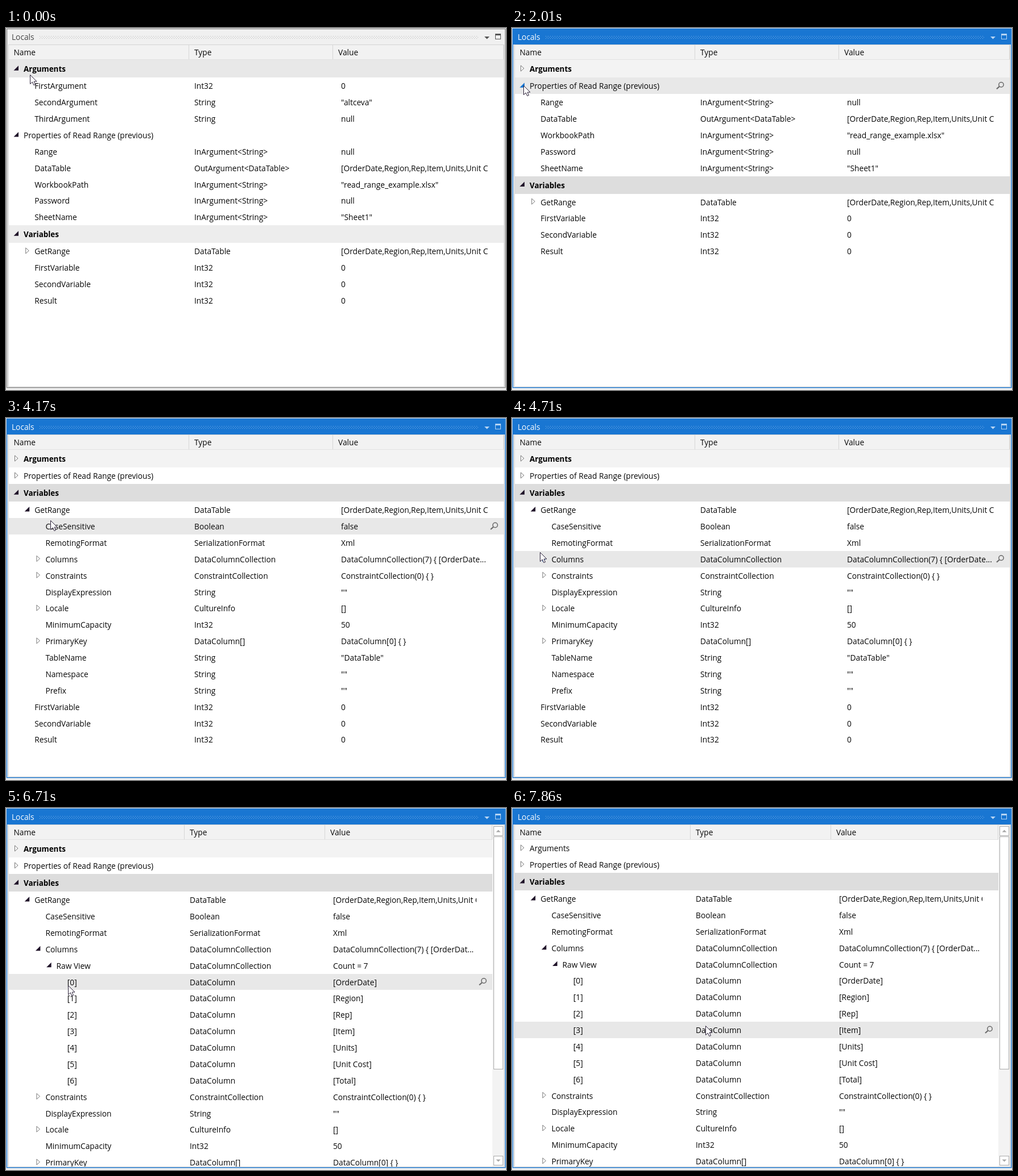
An HTML page with a canvas that plays this animation: 879 by 637 pixels, repeating every 8 s.

```html
<!DOCTYPE html>
<html lang="en">
<head>
<meta charset="utf-8">
<title>Locals</title>
<style>
  html, body { margin: 0; height: 100%; overflow: hidden; background: #f0f0f0; }
  canvas { display: block; }
</style>
</head>
<body>
<canvas id="stage" width="879" height="637"></canvas>
<script>
const ctx = document.getElementById('stage').getContext('2d');
const LOOP = 8000, TICK = 77.1;
const TOP = 56.3, ROW = 28.88, BAND = 31, BOTTOM = 631;
const BLUE = '#1976d2', INK = '#080808';
const REGULAR = '13.72px "Open Sans", sans-serif';
const BOLD = 'bold 13.4px "Open Sans", sans-serif';

// Cursor path: tick, x, y
const PATH = [
  [0, 42, 82], [4, 26, 50], [7, 21, 66], [10, 16, 70], [17, 16, 70],
  [26, 20, 101], [35, 20, 101], [42, 38, 160], [44, 38, 160],
  [49, 60, 166], [53, 60, 166], [54, 78, 180], [58, 72, 215],
  [63, 34, 250], [64, 34, 250], [67, 59, 250], [75, 59, 250],
  [86, 98, 288], [87, 109, 312], [92, 315, 360], [97, 335, 372], [102, 340, 383]
];
// First visible row: tick, row
const SCROLL = [[0, 0], [90, 3], [91, 6], [92, 7], [98, 4], [99, 1], [100, 0]];

const node = (name, type = '', value = '', children = null, open = () => false) =>
  ({ name, type, value, children, open });
const inString = (name, value) => node(name, 'InArgument<String>', value);
const always = () => true;

const ORDER = '[OrderDate,Region,Rep,Item,Units,Unit Cost,Total]';
const columnNames = ['OrderDate', 'Region', 'Rep', 'Item', 'Units', 'Unit Cost', 'Total'];

const args = node('Arguments', '', '', [
  node('FirstArgument', 'Int32', '0'),
  node('SecondArgument', 'String', '"altceva"'),
  node('ThirdArgument', 'String', 'null')
], tick => tick < 14);

const properties = node('Properties of Read Range (previous)', '', '', [
  inString('Range', 'null'),
  node('DataTable', 'OutArgument<DataTable>', ORDER),
  inString('WorkbookPath', '"read_range_example.xlsx"'),
  inString('Password', 'null'),
  inString('SheetName', '"Sheet1"')
], tick => tick < 31);

const rawView = node('Raw View', 'DataColumnCollection', 'Count = 7',
  columnNames.map((name, i) => node(`[${i}]`, 'DataColumn', `[${name}]`)), always);
const columns = node('Columns', 'DataColumnCollection', '', [rawView], tick => tick >= 70);
const namespace = node('Namespace', 'String', '""');

const variables = node('Variables', '', '', [
  node('GetRange', 'DataTable', ORDER, [
    node('CaseSensitive', 'Boolean', 'false'),
    node('RemotingFormat', 'SerializationFormat', 'Xml'),
    columns,
    node('Constraints', 'ConstraintCollection', 'ConstraintCollection(0) { }', []),
    node('DisplayExpression', 'String', '""'),
    node('Locale', 'CultureInfo', '[]', []),
    node('MinimumCapacity', 'Int32', '50'),
    node('PrimaryKey', 'DataColumn[]', 'DataColumn[0] { }', []),
    node('TableName', 'String', '"DataTable"'),
    namespace,
    node('Prefix', 'String', '""')
  ], tick => tick >= 44),
  node('FirstVariable', 'Int32', '0'),
  node('SecondVariable', 'Int32', '0'),
  node('Result', 'Int32', '0')
], always);

function flatten(nodes, tick, level = 0) {
  return nodes.flatMap(item => [
    { item, level },
    ...(item.children && item.open(tick) ? flatten(item.children, tick, level + 1) : [])
  ]);
}

function cursorAt(tick) {
  const next = PATH.findIndex(point => point[0] > tick);
  if (next < 0) return PATH[PATH.length - 1].slice(1);
  const [t0, x0, y0] = PATH[next - 1], [t1, x1, y1] = PATH[next];
  const k = (tick - t0) / (t1 - t0);
  return [Math.round(x0 + (x1 - x0) * k), Math.round(y0 + (y1 - y0) * k)];
}

function fill(color, x, y, w, h) {
  ctx.fillStyle = color;
  ctx.fillRect(x, y, w, h);
}

function box(color, x, y, w, h) {
  ctx.strokeStyle = color;
  ctx.lineWidth = 1;
  ctx.strokeRect(x + 0.5, y + 0.5, w - 1, h - 1);
}

function text(string, x, y, color = INK, font = REGULAR) {
  ctx.fillStyle = color;
  ctx.font = font;
  ctx.fillText(string, x, y);
}

function polygon(points, fillColor, strokeColor) {
  ctx.beginPath();
  points.forEach(([x, y]) => ctx.lineTo(x, y));
  ctx.closePath();
  if (fillColor) { ctx.fillStyle = fillColor; ctx.fill(); }
  if (strokeColor) { ctx.strokeStyle = strokeColor; ctx.lineWidth = 1; ctx.stroke(); }
}

function drawFrame(active) {
  fill('#f0f0f0', 0, 0, 879, 637);
  fill('#ffffff', 5, 30, 870, BOTTOM - 30);
  if (active) fill(BLUE, 2, 2, 875, 27);
  ctx.strokeStyle = active ? BLUE : '#8c8c8c';
  ctx.lineWidth = 1.4;
  ctx.strokeRect(1.5, 1.5, 876.3, 631.3);
  box('#d4d4d4', 4, 29, 872, 603);

  text('Locals', 10, 21, active ? '#ffffff' : '#444444');
  const dot = active ? '#74ade6' : '#bcbcbc';
  for (let row = 0; row < 3; row++)
    for (let x = 59 + (row % 2) * 2; x < 831; x += 4) fill(dot, x, 14 + row * 2, 1, 1);

  const icon = active ? '#b5d4f3' : '#555555';
  polygon([[841, 15], [850, 15], [845.5, 19.5]], icon);
  box(icon, 860, 10, 10, 10);
  fill(icon, 860, 10, 10, 3);
}

function drawHeader(layout) {
  fill('#f2f2f2', 5, 30, layout.right - 5, 25);
  fill('#e2e2e2', 5, 55, layout.right - 5, 1);
  for (const x of [layout.type - 10, layout.value - 15, layout.right - 1])
    fill('#d6d6d6', x, 30, 1, 25);
  text('Name', 13.5, 48);
  text('Type', layout.type, 48);
  text('Value', layout.value - 5, 48);
}

function drawExpander(x, y, open, hot) {
  if (open) polygon([[x - 17.5, y + 3], [x - 9, y - 5.5], [x - 9, y + 3]], hot ? BLUE : '#21152a');
  else polygon([[x - 15.5, y - 5.8], [x - 15.5, y + 4.2], [x - 10, y - 0.8]], '#ffffff', hot ? BLUE : '#787878');
}

function drawMagnifier(x, y) {
  ctx.strokeStyle = '#6a6a6a';
  ctx.lineWidth = 1.5;
  ctx.beginPath();
  ctx.arc(x + 2, y - 2, 4.2, 0, Math.PI * 2);
  ctx.stroke();
  ctx.lineWidth = 2.2;
  ctx.beginPath();
  ctx.moveTo(x - 1.2, y + 1.2);
  ctx.lineTo(x - 6, y + 5.5);
  ctx.stroke();
}

function drawRows(tick, layout, scroll, active, [mouseX, mouseY]) {
  ctx.save();
  ctx.beginPath();
  ctx.rect(5, 56, layout.right - 5, BOTTOM - 56);
  ctx.clip();

  let top = TOP;
  for (const { item, level } of flatten([args, properties, variables], tick).slice(scroll)) {
    if (top > BOTTOM) break;
    const band = item === variables || (item === args && tick < 93) || (item === namespace && scroll > 0);
    const height = band ? BAND : ROW;
    const bottom = top + height, middle = top + height / 2;
    const hover = mouseY >= top && mouseY < bottom;

    let color = band ? '#f3f3f3' : '#ffffff';
    if (hover) color = '#e8e8e8';
    if (item === variables) color = active ? '#dddddd' : '#ededed';
    const y0 = Math.round(top);
    fill(color, 5, y0, layout.right - 5, Math.round(bottom) - y0);

    const promoted = band && item === namespace;
    const x = 31 + 19.2 * (promoted ? 0 : level);
    const baseline = Math.round(middle + 5.5);
    if (item.children || promoted) {
      const hot = hover && Math.abs(mouseX - (x - 13)) < 8;
      drawExpander(x, middle, item.children && item.open(tick), hot);
    }
    text(item.name, x, baseline, band ? '#000000' : INK, band ? BOLD : REGULAR);

    if (!promoted) {
      text(item.type, layout.type, baseline);
      ctx.save();
      ctx.beginPath();
      ctx.rect(layout.value, top, layout.valueEnd - layout.value, height);
      ctx.clip();
      text(item === columns ? layout.columnsValue : item.value, layout.value, baseline);
      ctx.restore();
    }
    if (hover && !band) drawMagnifier(layout.right - 17, middle);
    top = bottom;
  }
  ctx.restore();
}

function drawScrollbar(scroll) {
  fill('#f3f3f3', 855, 30, 20, BOTTOM - 30);
  const part = (y, h) => {
    fill('#ffffff', 857, y, 17, h);
    box('#ababab', 857, y, 17, h);
  };
  part(32, 17);
  part(612, 17);
  polygon([[861.5, 42.5], [869.5, 42.5], [865.5, 38.5]], '#a6a6a6');
  polygon([[861.5, 618.5], [869.5, 618.5], [865.5, 622.5]], '#a6a6a6');
  part(Math.round(50 + 560 * scroll / 26), 410);
}

function drawCursor([x, y]) {
  const outline = [[0, 0], [0, 16], [3.8, 12.5], [6.3, 18], [9, 17], [6.6, 11.6], [11.5, 11.5]];
  polygon(outline.map(([dx, dy]) => [x + dx + 0.5, y + dy + 0.5]), '#ffffff', '#2a2038');
}

const WIDE = {
  type: 331, value: 589, valueEnd: 848, right: 875,
  columnsValue: 'DataColumnCollection(7) { [OrderDate...'
};
const NARROW = {
  type: 323, value: 575, valueEnd: 827, right: 855,
  columnsValue: 'DataColumnCollection(7) { [OrderDat...'
};

function render(now) {
  const tick = Math.floor((now % LOOP) / TICK + 0.1);
  const active = tick >= 12;
  const scrollable = tick >= 70;
  const layout = scrollable ? NARROW : WIDE;
  const scroll = SCROLL.filter(step => step[0] <= tick).pop()[1];
  const cursor = cursorAt(tick);

  drawFrame(active);
  drawHeader(layout);
  drawRows(tick, layout, scroll, active, cursor);
  if (scrollable) drawScrollbar(scroll);
  drawCursor(cursor);
}

const start = performance.now();
function loop() {
  render(performance.now() - start);
  requestAnimationFrame(loop);
}
loop();
</script>
</body>
</html>
```
